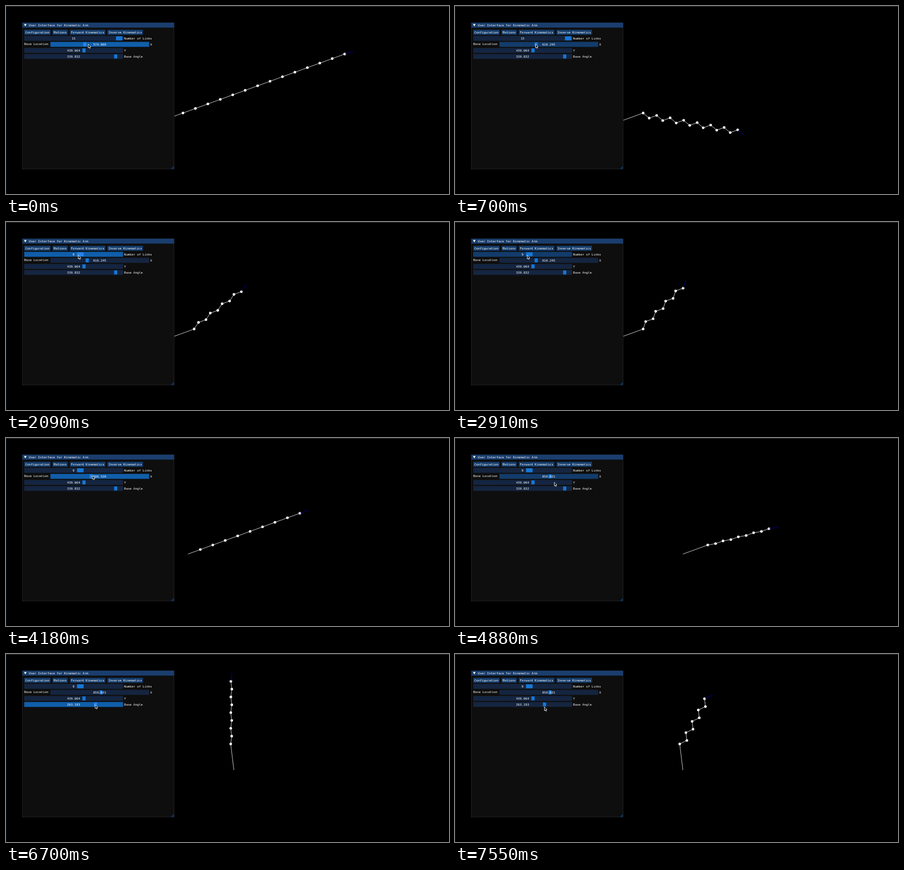
An HTML page with a canvas for the animation above (7.58 s loop, 800 by 342 pixels).

```html
<!DOCTYPE html>
<html lang="en">
<head>
<meta charset="utf-8">
<title>Kinematic arm</title>
<style>
  html, body { margin: 0; width: 100%; height: 100%; overflow: hidden; background: #000; }
  canvas { display: block; }
</style>
</head>
<body>
<canvas id="stage" width="800" height="342"></canvas>
<script>
const ctx = document.getElementById('stage').getContext('2d');
const LOOP = 7580, SCALE = 0.4785, TOP = 0.8, BASE_Y = 439.664;
const CHAR = 7 * SCALE, PAD = 4 * SCALE, ROW = 11, FIRST_ROW = 54.3;

const ramp = (t, from, to) => Math.min(1, Math.max(0, (t - from) / (to - from)));
const ease = (t, from, to) => {
  const f = ramp(t, from, to);
  return f * f * (3 - 2 * f);
};

// Sliders move in whole mouse steps
const settings = t => ({
  links: 15 - 2 * (t >= 1620) - Math.round(4 * ramp(t, 1620, 2050)),
  baseX: 859.9312 - 4.68627 * Math.round(
    52 + 12 * (1 - ramp(t, -100, 300)) - 15 * (t >= 4150) - 37 * ramp(t, 4190, 4500)),
  angle: 263.193 + 360 / 357 * Math.round(76 * (1 - ease(t, 5688, 6606)))
});

// Mouse moves: from, to, dx, dy
const moves = [
  [0, 300, -3, 0], [800, 1300, 49, -12], [1620, 2050, -64, 3], [3000, 3900, 25.5, 8],
  [4190, 4500, 20, 1], [4820, 4945, 7, 23], [5000, 5300, 14, 0], [5688, 6606, -36, 0],
  [7300, 7500, 0.5, 4]
];
const cursorAt = t => moves.reduce(([x, y], [from, to, dx, dy]) => {
  const f = ease(t, from, to);
  return [x + dx * f, y + dy * f];
}, [149, 70]);

// Mouse button held: from, to, slider row
const drags = [[0, 450, 1], [1600, 2150, 0], [4150, 4560, 1], [5420, 6950, 3]];

// Joint bend swings evenly between +90 and -90 degrees
const bendAt = t => Math.abs(((t - 962) * 0.1122 + 720) % 360 - 180) - 90;

function rect(x, y, w, h, color) {
  ctx.fillStyle = color;
  ctx.fillRect(x, y, w, h);
}

function text(str, x, midY, align = 'left') {
  ctx.save();
  ctx.translate(x, midY + 2);
  ctx.scale(SCALE, SCALE);
  ctx.font = '11.65px "DejaVu Sans Mono", monospace';
  ctx.textAlign = align;
  ctx.fillStyle = '#fff';
  ctx.fillText(str, 0, 0);
  ctx.restore();
}

function path(points, fill, stroke, width) {
  ctx.beginPath();
  points.forEach(p => ctx.lineTo(...p));
  if (fill) { ctx.fillStyle = fill; ctx.fill(); }
  if (stroke) { ctx.strokeStyle = stroke; ctx.lineWidth = width; ctx.stroke(); }
}

function drawArm(t, { links, baseX, angle }) {
  // Editing a value lays the arm out straight for a moment
  const straight = JSON.stringify(settings(t)) !== JSON.stringify(settings(t - 60));
  const bend = straight ? 0 : bendAt(t);
  const joints = [[baseX * SCALE, BASE_Y * SCALE + TOP]];
  for (let i = 0; i <= links; i++) {
    const a = (angle + (i % 2 ? bend : 0)) * Math.PI / 180;
    const length = SCALE * (i === links ? 34.5 : straight ? 50 : i ? 30 : 100);
    const [x, y] = joints[i];
    joints.push([x + length * Math.cos(a), y + length * Math.sin(a)]);
  }
  path(joints.slice(0, -1), null, '#fff', 0.75);
  ctx.fillStyle = '#fff';
  for (const [x, y] of joints.slice(1, -1)) {
    ctx.beginPath();
    ctx.arc(x, y, 2.4, 0, 7);
    ctx.fill();
  }
  path(joints.slice(-2), null, '#0000c8', 0.7);
}

function drawPanel(t, { links, baseX, angle }) {
  const [mx, my] = cursorAt(t - 30);
  const row = Math.floor((my - FIRST_ROW) / ROW);
  const inside = my - FIRST_ROW - row * ROW < 9 && mx > (row === 1 ? 80 : 33);
  const drag = drags.find(([from, to]) => t >= from && t < to);
  const active = drag ? drag[2] : -1;
  const hovered = inside && !drag ? row : -1;

  const slider = (i, x, value, label, grab, width = 5.7) => {
    const y = FIRST_ROW + i * ROW;
    rect(x, y, 178.3, 9, i === active ? '#105eaa' : i === hovered ? '#133c6b' : '#152540');
    rect(grab, y + 0.9, width, 7.2, i === active ? '#2684eb' : '#1678d8');
    text(value, x + 89, y + 4.5, 'center');
    text(label, x + 180.3, y + 4.5);
  };

  rect(29, 30, 275, 267, '#303038');
  rect(29.5, 30.5, 274, 266, '#0e0e0e');
  rect(29.5, 30.4, 274, 8.9, '#1a3e6e');
  path([[32.5, 32.8], [37.3, 32.8], [34.9, 37]], '#fff');
  text('User Interface for Kinematic Arm', 41.3, 35);
  path([[303.5, 290.5], [303.5, 296.5], [297.5, 296.5]], '#132f54');

  let x = 33;
  for (const name of ['Configuration', 'Motions', 'Forward Kinematics', 'Inverse Kinematics']) {
    const width = name.length * CHAR + 2 * PAD;
    rect(x, 43.3, width, 9, '#163e6e');
    text(name, x + PAD, 47.8);
    x += width + 2 * PAD;
  }

  slider(0, 33, String(links), 'Number of Links', 34.5 + (links - 1) * 11.72, 11.9);
  text('Base Location', 33, 68.6);
  slider(1, 80.2, baseX.toFixed(3), 'X', 80.8 + baseX / 9.78);
  slider(2, 33, BASE_Y.toFixed(3), 'Y', 138);
  slider(3, 33, angle.toFixed(3), 'Base Angle', 33.8 + angle * 0.475);
}

function drawCursor(t) {
  const [x, y] = cursorAt(t);
  const arrow = [[0, 0], [0, 6.6], [1.5, 5.2], [2.6, 7.6], [3.7, 7.1], [2.7, 4.8], [4.7, 4.7], [0, 0]];
  path(arrow.map(([dx, dy]) => [x + dx - 0.5, y + dy - 0.5]), '#000', '#fff', 0.8);
}

function frame(now) {
  const t = now % LOOP, values = settings(t);
  rect(0, 0, 800, 342, '#000');
  rect(0, 0, 800, 1, '#323232');
  rect(0, 1, 0.7, 341, '#0c1a28');
  drawArm(t, values);
  drawPanel(t, values);
  drawCursor(t);
  requestAnimationFrame(frame);
}
requestAnimationFrame(frame);
</script>
</body>
</html>
```
